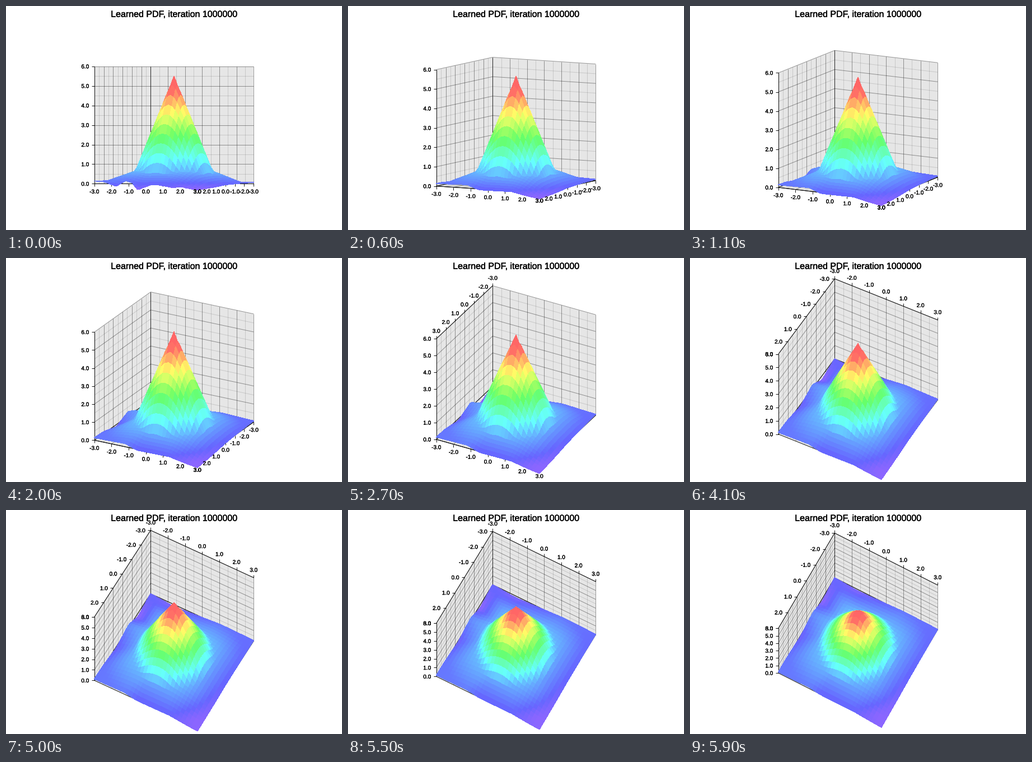
Animation, 600 px wide and 400 px high, one loop 6 s. Source, as a matplotlib script:

```python
import colorsys

import numpy as np
import matplotlib.pyplot as plt
from matplotlib.animation import FuncAnimation
from matplotlib.collections import LineCollection, PolyCollection
from matplotlib.patheffects import withStroke

W, H, DPI = 600, 400, 100
FRAMES, INTERVAL = 60, 100
CX, CY = 300.0, 212.6
UNIT = 34.94                      # pixels per data unit
AZIMUTH = 0.5
TILT_STEP = 0.02                  # radians per frame
Y_FLIP, X_FLIP = 0.49, 0.77       # tilts at which the axes jump to the top
CELLS = 30
PEAK, SLOPE = 5.5, 2.47

plt.rcParams["font.family"] = "Liberation Sans"
plt.rcParams["text.hinting"] = "no_hinting"


def project(points, tilt):
    """Orthographic view of (..., 3) data points in stage pixels."""
    x, y, z = np.moveaxis(np.asarray(points, float), -1, 0)
    ca, sa = np.cos(AZIMUTH), np.sin(AZIMUTH)
    depth = x * sa + y * ca
    px = CX + UNIT * (x * ca - y * sa)
    py = CY + UNIT * (depth * np.sin(tilt) - (z - 3) * np.cos(tilt))
    return np.stack([px, py], axis=-1)


def height(x, y):
    """A cone on a square skirt whose rim is wavy."""
    cone = PEAK - SLOPE * np.hypot(x, y)
    square = (x**4 + y**4) ** 0.25
    skirt = 0.62 * np.clip(1 - (square - 1.75) / 1.25, 0, 1)
    angle = np.degrees(np.arctan2(y, x))
    rim = np.interp(
        angle,
        [0, 45, 65, 100, 112, 145, 167, 193, 209, 225, 240, 290],
        [-0.05, -0.3, -0.03, -0.05, 0.18, 0.12, -0.13, 0.28, -0.33, 0, -0.2, 0.13],
        period=360)
    return np.maximum(cone, skirt) + rim * np.clip((square - 1.6) / 1.4, 0, 1)


def surface_cells():
    """Quads from back to front and the colour of each."""
    axis = np.linspace(-3, 3, CELLS + 1)
    x, y = np.meshgrid(axis, axis)
    p = np.stack([x, y, height(x, y)], axis=-1)
    quads = np.stack([p[:-1, :-1], p[:-1, 1:], p[1:, 1:], p[1:, :-1]], axis=2)
    quads = quads.reshape(-1, 4, 3)
    mid = quads.mean(axis=1)
    order = np.argsort(mid[:, 0] * np.sin(AZIMUTH) + mid[:, 1] * np.cos(AZIMUTH))
    hues = np.clip(2 / 3 * (1 - mid[order, 2] / 4.75), 0, 0.75)
    return quads[order], [colorsys.hsv_to_rgb(h, 0.6, 1) for h in hues]


def grid_lines(offset):
    """Lines on both walls and the floor, one unit apart."""
    lines = []
    for v in np.arange(-3 + offset, 3.01):
        lines += [
            [(v, -3, 0), (v, -3, 6)], [(-3, v, 0), (-3, v, 6)],
            [(v, -3, 0), (v, 3, 0)], [(-3, v, 0), (3, v, 0)],
            [(-3, -3, v + 3), (3, -3, v + 3)],
            [(-3, -3, v + 3), (-3, 3, v + 3)],
        ]
    return np.array(lines, float)


def box_walls():
    """Floor, left wall and right wall of the box."""
    a, b = np.array([-3, 3, 3, -3]), np.array([-3, -3, 3, 3])
    low = np.full(4, -3)
    return np.array([np.stack(face, axis=1) for face in
                     ((a, b, low + 3), (low, a, b + 3), (a, low, b + 3))])


WALLS = box_walls()
BASE = np.stack([WALLS[0], np.roll(WALLS[0], -1, axis=0)], axis=1)
CORNER = np.array([[(-3, -3, 0), (-3, -3, 6)]], float)
VALUES = np.arange(-3, 4)

# tick end, label offset to the baseline, alignment
SIDES = {
    "down": ((0, 5), (0, 17.3), "center"),
    "up": ((0, -5), (0, -10.5), "center"),
    "left": ((-5, 0), (-9.5, 3.6), "right"),
}

fig = plt.figure(figsize=(W / DPI, H / DPI), dpi=DPI, facecolor="white")
ax = fig.add_axes([0, 0, 1, 1])
ax.set_xlim(0, W)
ax.set_ylim(H, 0)
ax.axis("off")


def pt(pixels):
    return pixels * 72 / DPI


def add_lines(alpha, zorder):
    lines = LineCollection([], colors=[(0, 0, 0, alpha)], linewidths=pt(1),
                           zorder=zorder)
    return ax.add_collection(lines, autolim=False)


def add_text(x, y, text, size, weight):
    """Text made a little heavier by a thin outline."""
    return ax.text(x, y, text, fontsize=pt(size), ha="center", va="baseline",
                   zorder=7, path_effects=[withStroke(linewidth=pt(weight),
                                                      foreground="black")])


cells, cell_colors = surface_cells()
walls = ax.add_collection(
    PolyCollection([], facecolors="#e6e6e6", edgecolors="none", zorder=1),
    autolim=False)
surface = ax.add_collection(
    PolyCollection([], facecolors=cell_colors, edgecolors=cell_colors,
                   linewidths=pt(0.5), antialiaseds=False, zorder=5),
    autolim=False)

fixed_lines = [
    (add_lines(0.13, 2), grid_lines(0.5)),
    (add_lines(0.38, 2), grid_lines(0)),
    (add_lines(0.6, 3), CORNER),
    (add_lines(0.7, 3), BASE),
]
axis_lines = add_lines(0.9, 4)

add_text(300.3, 19.6, "Learned PDF, iteration 1000000", 16, 0.4)
labels = {
    name: [add_text(0, 0, f"{v:.1f}", 10, 0.3) for v in VALUES + start]
    for name, start in (("x", 0), ("y", 0), ("z", 3))
}


def axis_layout(tilt):
    """Tick points and label side of each axis at this tilt."""
    x_top, y_top = tilt > X_FLIP, tilt > Y_FLIP
    x_ticks = [(v, -3, 6) if x_top else (v, 3, 0) for v in VALUES]
    y_ticks = [(-3, v, 6) if y_top else (3, v, 0) for v in VALUES]
    z_ticks = [(-3, 3, v + 3) for v in VALUES]
    steep = np.sin(tilt) > np.tan(AZIMUTH)
    y_side = ("left" if steep else "up") if y_top else "down"
    return {"x": (x_ticks, "up" if x_top else "down"),
            "y": (y_ticks, y_side),
            "z": (z_ticks, "left")}


def draw(i):
    tilt = TILT_STEP * i
    walls.set_verts(project(WALLS, tilt))
    surface.set_verts(project(cells, tilt))
    for artist, lines in fixed_lines:
        artist.set_segments(project(lines, tilt))

    segments = []
    for name, (ticks, side) in axis_layout(tilt).items():
        tick, shift, align = SIDES[side]
        points = project(ticks, tilt)
        segments.append(points[[0, -1]])
        segments += [np.array([p, p + tick]) for p in points]
        for label, p in zip(labels[name], points):
            label.set_position(p + shift)
            label.set_ha(align)
    axis_lines.set_segments(segments)
    return []


anim = FuncAnimation(fig, draw, frames=FRAMES, interval=INTERVAL,
                     init_func=lambda: draw(0), repeat=True, repeat_delay=0,
                     blit=False)
plt.show()
```
